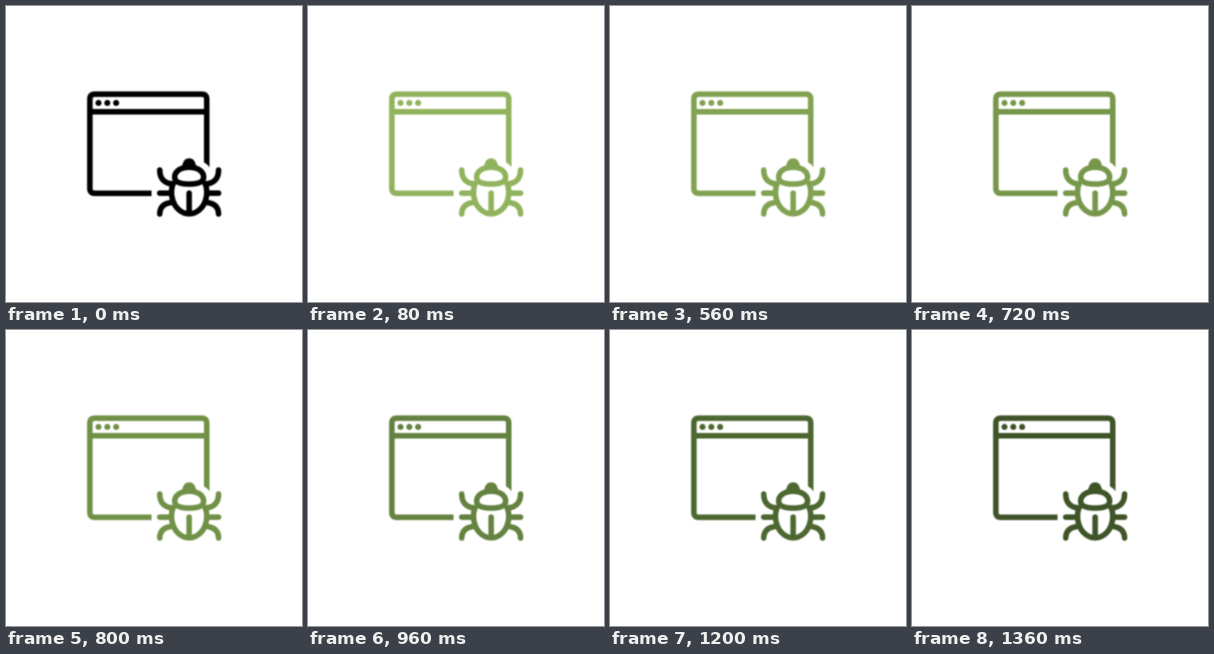
Animation, 480 px wide and 480 px high, one loop 1440 ms. Source, as an HTML page:

```html
<!DOCTYPE html>
<html lang="en">
<head>
<meta charset="utf-8">
<title>Browser bug icon</title>
<style>
  html, body { margin: 0; width: 100%; height: 100%; overflow: hidden; background: #fff; }
  svg { display: block; width: 100%; height: 100%; color: #000; }
  .line { fill: none; stroke: currentColor; stroke-width: 9; }
  .round { stroke-linecap: round; }
  .solid { fill: currentColor; }
</style>
</head>
<body>
<svg id="icon" viewBox="0 0 480 480">
  <defs>
    <filter id="soft" color-interpolation-filters="sRGB">
      <feGaussianBlur stdDeviation="0.9"/>
    </filter>
    <g id="legs" class="line round">
      <path d="M249.3 266C249.3 279 256 288 271 288.5"/>
      <path d="M249.3 303.5H268"/>
      <path d="M249.3 337.3C249.3 325 257 319 271 318.5"/>
    </g>
  </defs>

  <g filter="url(#soft)">
    <path class="line" d="M236 303.7H144Q136 303.7 136 295.7V151Q136 143 144 143H317.5Q325.5 143 325.5 151V252"/>
    <path class="solid" d="M321 250H330V261.5Q326 256 321 253.5Z"/>
    <path class="line" d="M136 171.5H325.5"/>
    <g class="solid">
      <circle cx="150" cy="157.2" r="4.9"/>
      <circle cx="164.3" cy="157.2" r="4.9"/>
      <circle cx="178.6" cy="157.2" r="4.9"/>
    </g>

    <use href="#legs"/>
    <use href="#legs" transform="matrix(-1 0 0 1 594 0)"/>
    <path class="solid" d="M284 262C287 259 286 247 297 247S307 259 310 262Z"/>
    <path class="line" d="M297 261.5C283 261.5 273.5 268 273.5 277.5C273.5 286 282 288.8 297 288.8S320.5 286 320.5 277.5C320.5 268 311 261.5 297 261.5Z"/>
    <path class="line" d="M271 287C268 296 267.5 305 270 313.5C274 328 285 337 297 337S320 328 324 313.5C326.5 305 326 296 323 287"/>
    <path class="line round" d="M297 303.5V335"/>
  </g>
</svg>
<script>
  const LOOP = 1440, STEP = 80;
  // Time in ms, then red, green, blue.
  const stops = [
    [80, 146, 179, 93],
    [560, 130, 162, 82],
    [800, 113, 145, 71],
    [1040, 93, 122, 61],
    [1200, 77, 103, 48],
    [1360, 63, 84, 40]
  ];
  const icon = document.getElementById('icon');

  function colorAt(t) {
    if (t < STEP) return '#000';
    const i = Math.max(1, stops.findIndex(s => s[0] >= t));
    const a = stops[i - 1], b = stops[i];
    const k = (t - a[0]) / (b[0] - a[0]);
    const rgb = [1, 2, 3].map(c => Math.round(a[c] + (b[c] - a[c]) * k));
    return `rgb(${rgb})`;
  }

  const frames = Array.from({ length: LOOP / STEP }, (_, n) => ({
    color: colorAt(n * STEP),
    offset: n * STEP / LOOP,
    easing: 'steps(1, end)'
  }));
  frames.push({ color: frames[frames.length - 1].color, offset: 1 });
  icon.animate(frames, { duration: LOOP, iterations: Infinity });
</script>
</body>
</html>
```
